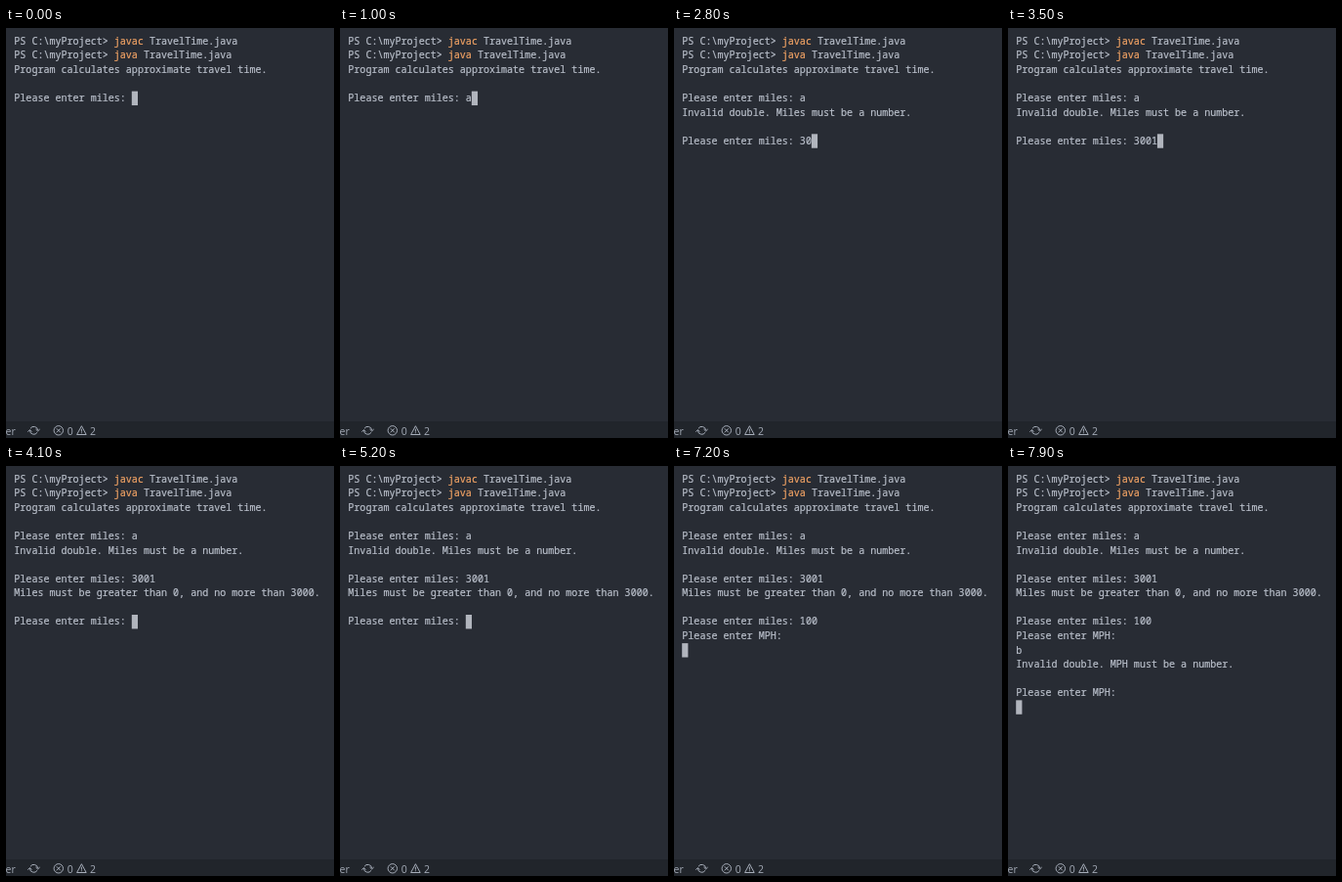
Write an HTML page that moves like this. It is 336x419 px and loops after 8 s.

```html
<!DOCTYPE html>
<html lang="en">
<head>
<meta charset="utf-8">
<title>Travel time terminal</title>
<style>
  html, body { margin: 0; width: 100%; height: 100%; overflow: hidden; background: #282c34; }
  #stage { position: relative; width: 336px; height: 419px; overflow: hidden; background: #282c34; }
  #screen {
    position: absolute; left: 8.3px; top: 5.8px; margin: 0;
    font: 500 10.05px/14.56px "Noto Sans Mono", monospace;
    font-variant-ligatures: none; white-space: pre;
    color: #b9bfca; -webkit-text-stroke: 0.2px;
  }
  #screen b { font-weight: inherit; color: #f0a264; }
  svg { position: absolute; left: 0; top: 0; }
  svg text { font: 10.5px "Open Sans", sans-serif; fill: #a5acb8; }
  #icons { fill: none; stroke: #a5acb8; stroke-width: 1; }
</style>
</head>
<body>
<div id="stage">
  <pre id="screen"></pre>
  <svg width="336" height="419">
    <rect id="cursor" width="6.2" height="14.4" fill="#b1b5bd"/>
    <rect y="402" width="336" height="17" fill="#21252b"/>
    <text x="-0.4" y="415.5">er</text>
    <g id="icons">
      <path d="M25 409.3a4.1 4.1 0 0 1 7.6 2M32 413.3a4.1 4.1 0 0 1-7.6-2"/>
      <path d="M30.5 410l2.1 2 2.1-2M22.3 412.6l2.1-2 2.1 2"/>
      <circle cx="53.8" cy="411.3" r="4.7"/>
      <path d="M51.8 409.3l4 4m0-4l-4 4"/>
      <path d="M77.4 406.7l4.8 8.8h-9.6zM77.4 409.7v3M77.4 413.3v1"/>
    </g>
    <text x="62.8" y="415.5">0</text>
    <text x="86" y="415.5">2</text>
  </svg>
</div>
<script>
const LOOP = 8000, LEFT = 8.2, TOP = 6.4, COL = 6.03, ROW = 14.56;
const askMiles = "\n\nPlease enter miles: ";
const askMph = "\nPlease enter MPH:\n";

// Each step appends output or typed keys at the given time in ms.
const steps = [
  [0, "PS C:\\myProject> javac TravelTime.java\n" +
      "PS C:\\myProject> java TravelTime.java\n" +
      "Program calculates approximate travel time." + askMiles],
  [900, "a"],
  [1400, "\nInvalid double. Miles must be a number." + askMiles],
  [2300, "3"], [2800, "0"], [3000, "0"], [3300, "1"],
  [3900, "\nMiles must be greater than 0, and no more than 3000." + askMiles],
  [5400, "1"], [5600, "0"], [5800, "0"],
  [6100, askMph],
  [7500, "b"],
  [7800, "\nInvalid double. MPH must be a number.\n" + askMph]
];

const screenEl = document.getElementById("screen");
const cursorEl = document.getElementById("cursor");
let shown = null;

function render(time) {
  const text = steps.filter(([at]) => at <= time).map(([, output]) => output).join("");
  if (text === shown) return;
  shown = text;
  screenEl.innerHTML = text.replace(/> (javac?) /g, "&gt; <b>$1</b> ");
  const lines = text.split("\n");
  cursorEl.setAttribute("x", LEFT + lines.at(-1).length * COL);
  cursorEl.setAttribute("y", TOP + (lines.length - 1) * ROW);
}

const start = performance.now();
function tick() {
  render((performance.now() - start) % LOOP);
  requestAnimationFrame(tick);
}
tick();
</script>
</body>
</html>
```
